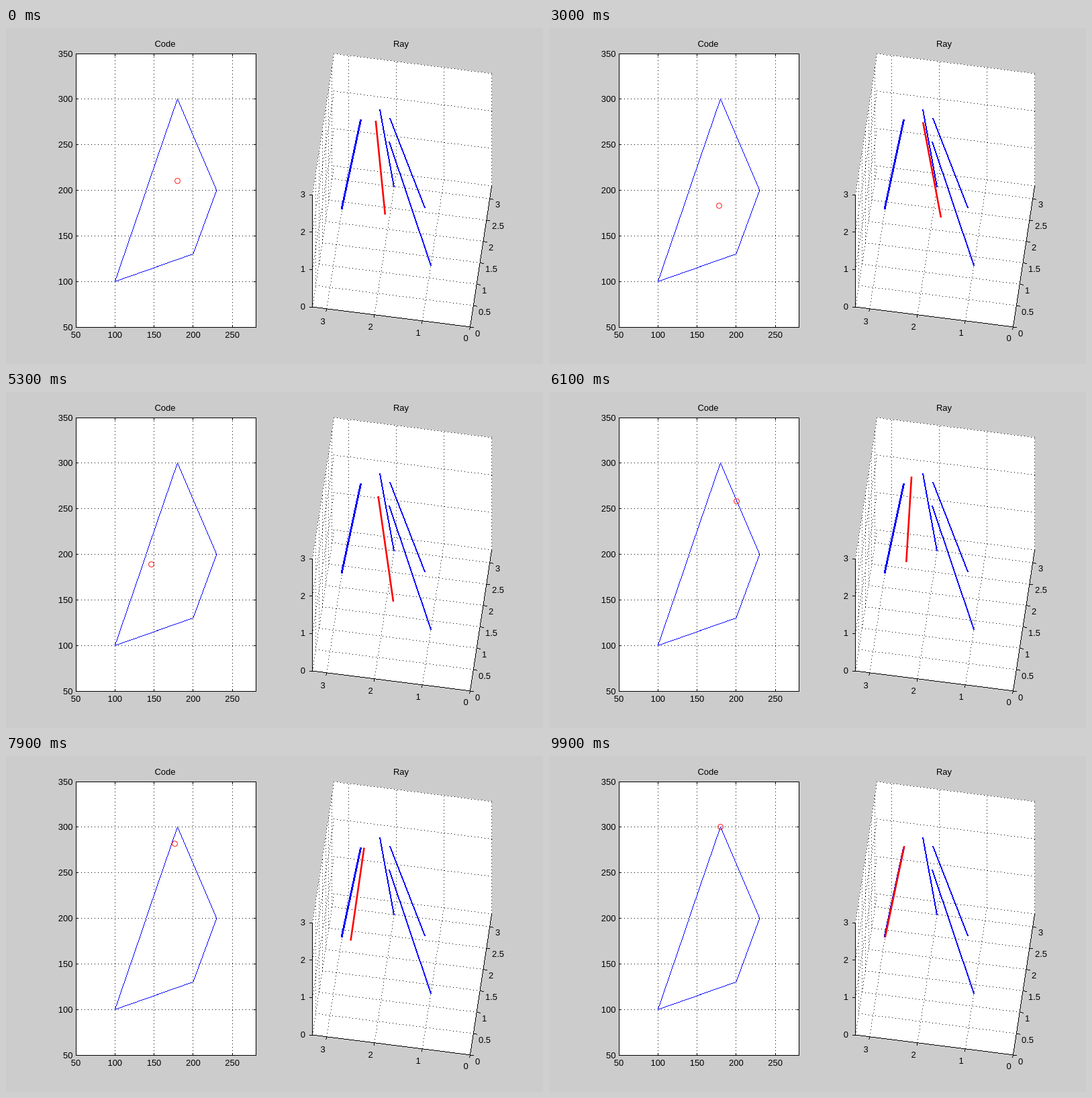
Write an HTML page with a canvas that moves like this. It is 800 by 500 pixels and loops after 10 s.

```html
<!DOCTYPE html>
<html>
<head>
<meta charset="utf-8">
<style>
  html, body { margin: 0; width: 800px; height: 500px; overflow: hidden; background: #ccc; }
  canvas, svg { position: absolute; left: 0; top: 0; }
  text { font: 13px "Liberation Sans", Arial, sans-serif; fill: #000; }
</style>
</head>
<body>
<canvas id="plot" width="800" height="500"></canvas>
<svg id="labels" width="800" height="500"></svg>
<script>
const ctx = document.getElementById('plot').getContext('2d');
const labels = document.getElementById('labels');
const STEP = 100, COUNT = 100, TURNS = 5;
const BLUE = '#00f', RED = '#f00';

// Data to pixels, left plot
const px = x => 104 + (x - 50) * 268 / 230;
const py = y => 445 - (y - 50) * 407 / 300;
// Data to pixels, right plot
const LIMIT = 3.3;
const project = (x, y, z) => [
  691.5 - 71.2 * x + 9.75 * y,
  444.8 - 9 * x - 63.6 * y - 55.7 * z
];

function label(str, x, y, anchor = 'middle') {
  const el = document.createElementNS('http://www.w3.org/2000/svg', 'text');
  el.setAttribute('x', x);
  el.setAttribute('y', y);
  el.setAttribute('text-anchor', anchor);
  el.textContent = str;
  labels.append(el);
}

// Hard-edged pixel line; every nth pixel only when gap > 1
function line([x1, y1], [x2, y2], color = '#000', width = 1, gap = 1) {
  const n = Math.max(1, Math.round(Math.max(Math.abs(x2 - x1), Math.abs(y2 - y1))));
  ctx.fillStyle = color;
  for (let i = 0; i <= n; i += gap) {
    const x = x1 + (x2 - x1) * i / n, y = y1 + (y2 - y1) * i / n;
    ctx.fillRect(Math.floor(x - (width - 1) / 2), Math.floor(y), width, 1);
  }
}
const dots = (a, b) => line(a, b, '#000', 1, 5);

function fillShape(points) {
  ctx.fillStyle = '#fff';
  ctx.beginPath();
  points.forEach(p => ctx.lineTo(...p));
  ctx.fill();
}

function drawCodeAxes() {
  ctx.fillStyle = '#fff';
  ctx.fillRect(104, 38, 269, 408);
  for (let x = 100; x <= 250; x += 50) {
    const p = px(x);
    dots([p, 38], [p, 445]);
    line([p, 445], [p, 442]);
    line([p, 38], [p, 41]);
  }
  for (let y = 100; y <= 300; y += 50) {
    const p = py(y);
    dots([372, p], [104, p]);
    line([104, p], [107, p]);
    line([372, p], [369, p]);
  }
  const box = [[104, 38], [372, 38], [372, 445], [104, 445]];
  box.forEach((p, i) => line(p, box[(i + 1) % 4]));

  const quad = [[100, 100], [180, 300], [230, 200], [200, 130]].map(([x, y]) => [px(x), py(y)]);
  quad.forEach((p, i) => line(p, quad[(i + 1) % 4], BLUE));
}

function drawRayAxes() {
  const L = LIMIT, P = project;
  fillShape([P(L, 0, 0), P(L, 0, 3), P(L, L, 3), P(0, L, 3), P(0, L, 0), P(0, 0, 0)]);
  for (let k = 0; k <= 3; k++) {
    dots(P(k, 0, 0), P(k, L, 0));
    dots(P(k, L, 0), P(k, L, 3));
    dots(P(L, L, k), P(0, L, k));
    dots(P(L, 0, k), P(L, L, k));
    const [x, y] = P(k, 0, 0), [zx, zy] = P(L, 0, k);
    line([x, y], [x - 1, y + 4]);
    line([zx, zy], [zx - 4, zy]);
  }
  for (let k = 0; k <= 3; k += 0.5) {
    dots(P(0, k, 0), P(L, k, 0));
    dots(P(L, k, 0), P(L, k, 3));
    const [x, y] = P(0, k, 0);
    line([x, y], [x + 5, y + 1]);
  }
  line(P(L, 0, 0), P(L, 0, 3));
  line(P(L, 0, 0), P(0, 0, 0));
  line(P(0, 0, 0), P(0, L, 0));
}

function addLabels() {
  label('Code', 237, 28);
  label('Ray', 588.5, 28);
  for (let x = 50; x <= 250; x += 50) label(x, px(x), 461);
  for (let y = 50; y <= 350; y += 50) label(y, 99.5, Math.floor(py(y)) + 5, 'end');
  for (let k = 0; k <= 3; k++) {
    label(k, 685 - 71 * k, 466 - 8.5 * k);
    label(k, 446, 419 - 55.7 * k, 'end');
  }
  for (let k = 0; k <= 3; k += 0.5) label(k, 699 + 10 * k, 459 - 64 * k, 'start');
}

function draw(i) {
  ctx.fillStyle = '#ccc';
  ctx.fillRect(0, 0, 800, 500);
  drawCodeAxes();
  drawRayAxes();

  // Marker spirals outwards on an ellipse
  const s = i / (COUNT - 1), a = s * TURNS * 2 * Math.PI;
  const dx = 70 * s * Math.sin(a), dy = 90 * s * Math.cos(a);
  ctx.strokeStyle = RED;
  ctx.lineWidth = 1;
  ctx.beginPath();
  ctx.arc(Math.floor(px(180 + dx)) + 0.5, Math.floor(py(210 + dy)) + 0.5, 4, 0, 7);
  ctx.stroke();

  line([557, 121], [578, 236], BLUE, 2);
  line([572, 134], [624, 267], BLUE, 2);
  line([528.5, 136], [500, 269], BLUE, 3);
  // The moving ray depends linearly on the marker's offset
  ctx.lineWidth = 2.6;
  ctx.beginPath();
  ctx.moveTo(550.8 + 0.04 * dx - 0.239 * dy, 138 - 0.48 * dx - 0.044 * dy);
  ctx.lineTo(564.8 + 0.09 * dx - 0.711 * dy, 277.6 - 0.965 * dx - 0.089 * dy);
  ctx.stroke();
  line([571, 169], [633, 353], BLUE, 2);
}

addLabels();
let last = -1;
const start = performance.now();
function tick() {
  const i = Math.floor((performance.now() - start) / STEP) % COUNT;
  if (i !== last) draw(last = i);
  requestAnimationFrame(tick);
}
tick();
</script>
</body>
</html>
```
